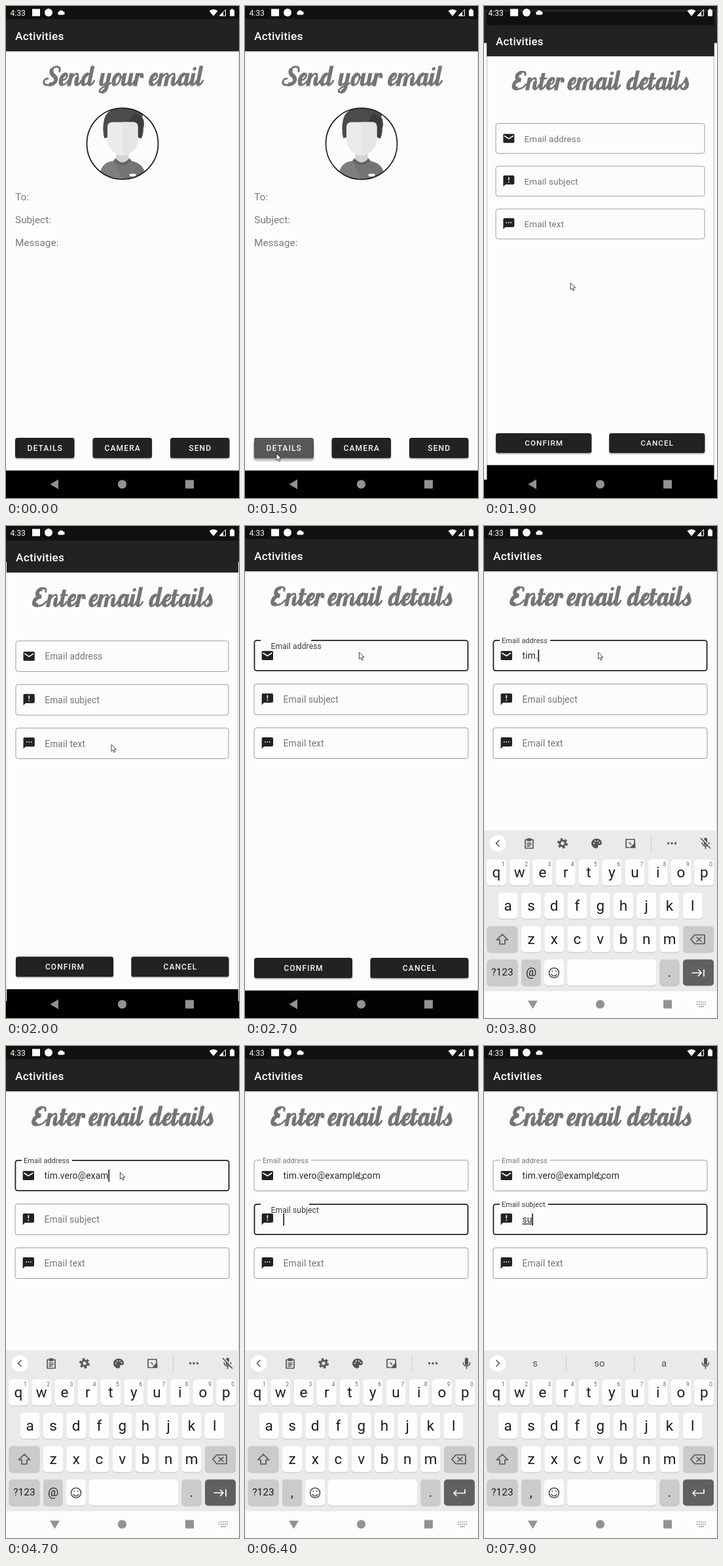
These frames come from a looping animation (356x752 px, 8 s). An HTML page:

```html
<!DOCTYPE html>
<html lang="en">
<head>
<meta charset="utf-8">
<title>Activities</title>
<style>
  html, body { margin: 0; width: 100%; height: 100%; overflow: hidden; background: #000; }
  svg { display: block; width: 356px; height: 752px; font-family: Roboto, sans-serif; }
  .bar { font-size: 17.3px; font-weight: 500; letter-spacing: .25px; fill: #fff; }
  .info { font-size: 15.4px; fill: #7a7a7a; }
  .btn { font-size: 12.1px; font-weight: 500; letter-spacing: 1.08px; fill: #f4f4f4; text-anchor: middle; }
  .title { fill: none; stroke: #757575; }
  .thick { stroke-width: 5.8; }
  .thin { stroke-width: 2.9; stroke-linecap: round; }
  .label, .value { font-size: 13.85px; letter-spacing: .13px; }
  .value { fill: #2a2a2a; }
  .line { fill: none; stroke: #555; stroke-width: 1.7; stroke-linecap: round; stroke-linejoin: round; }
  .key { fill: #1d1d1d; text-anchor: middle; }
  .hint { font-size: 8.5px; fill: #666; text-anchor: middle; }
  .word { font-size: 15px; fill: #555; text-anchor: middle; }
</style>
</head>
<body>
<svg viewBox="0 0 356 752">
  <defs>
    <clipPath id="face"><circle cx="178" cy="210.5" r="54.5"/></clipPath>
    <clipPath id="press"><rect x="14" y="660" width="90.5" height="31" rx="3.5"/></clipPath>
    <clipPath id="board"><rect y="465" width="356" height="247"/></clipPath>
    <g id="frame">
      <rect width="356" height="752"/>
      <rect width="356" height="20" fill="#101010"/>
      <rect y="20" width="356" height="49.3" fill="#222"/>
      <rect y="69.3" width="356" height="640.7" fill="#fcfcfc"/>
      <path d="M355.5,70V710" stroke="#d2d2d2"/>
      <text class="bar" x="14" y="51.7">Activities</text>
    </g>
  </defs>

  <g id="main">
    <use href="#frame"/>
    <g clip-path="url(#face)">
      <path d="M142,268C143,246 150,239 169,236H187C206,239 213,246 214,268Z" fill="#747474"/>
      <path d="M142,268C143,246 150,239 163,237Q172,247 178,268Z" fill="#7e7e7e"/>
      <path d="M164,236Q178,250 192,236L187,232H169Z" fill="#646464"/>
      <path d="M168.500,218H187.500V234Q178,244 168.500,234Z" fill="#d4d4d4"/>
      <path d="M150,202Q147,188 149.500,176Q153,155 178,156Q190,154 199,160L211,164L208,169Q213,177 210,187Q210,198 206,203L201,200V185H155V201Z" fill="#4b4b4b"/>
      <path d="M196,163L207,170Q211,178 207,190V202L201,199V184L186,180Z" fill="#3c3c3c"/>
      <path d="M155,184Q156,177 163,177.500H194Q201,177 201.500,184V203Q201,224 178,229Q155,224 155,203Z" fill="#ebebeb"/>
      <path d="M178,177.500H194Q201,177 201.500,184V203Q201,224 178,229Z" fill="#e5e5e5"/>
      <rect x="188.500" y="256.500" width="10" height="4" rx="2" fill="#fff"/>
    </g>
    <circle cx="178" cy="210.500" r="54.500" fill="none" stroke="#151515" stroke-width="1.700"/>
    <text class="info" x="14" y="296.500">To:</text>
    <text class="info" x="14" y="331.500">Subject:</text>
    <text class="info" x="14" y="366.500">Message:</text>
  </g>

  <g id="details"><use href="#frame"/></g>

  <g clip-path="url(#board)"><g id="keys">
    <rect y="465" width="356" height="250" fill="#eaeaea"/>
    <circle cx="21" cy="485" r="12.500" fill="#fff"/>
    <g id="tools" class="line">
      <path d="M23,480.500L18.500,485L23,489.500"/>
      <path d="M63,479.500H75V492.500H63ZM66.500,478V481H71.500V478ZM66,484.500H72M66,487H72M66,489.500H70"/>
      <circle cx="120" cy="485" r="4.300" stroke-width="3"/>
      <circle cx="120" cy="485" r="6.800" stroke-width="2.400" stroke-linecap="butt" stroke-dasharray="3.560"/>
      <path d="M172,478.500A7,6.500 0 1 0 172,491.800Q174.500,491 173,488.500Q173,487 175,487H177Q179.500,486 179.300,484Q178,478.500 172,478.500Z" fill="#555"/>
      <path d="M168,485h.1M170,481.500h.1M174,481.500h.1M176.500,484h.1" stroke="#eaeaea" stroke-width="2"/>
      <path d="M222,491.500H217V479H230V485"/>
      <path d="M222,484L224.500,486.500M224,491.500H230.500V485Z" fill="#555"/>
      <path d="M255.500,474V497" stroke="#ccc" stroke-width="1"/>
      <path d="M281.500,485h.1M287,485h.1M292.500,485h.1" stroke-width="3.400"/>
    </g>
    <g id="strip">
      <path class="line" d="M19,480.500L23.500,485L19,489.500"/>
      <path d="M125.500,474V497M229.500,474V497" stroke="#ccc"/>
      <text class="word" x="78" y="490">s</text>
      <text class="word" x="176.500" y="490">so</text>
      <text class="word" x="275" y="490">a</text>
    </g>
    <g transform="translate(338.500 485)">
      <rect x="-2.600" y="-8.500" width="5.200" height="11" rx="2.600" fill="#555"/>
      <path class="line" d="M-5.200,-1A5.200,5.200 0 0 0 5.200,-1M0,4.500V8"/>
      <g id="muted"><path d="M-6,-8.500L8,6.500" stroke="#eaeaea" stroke-width="2"/><path class="line" d="M-7,-7.500L7,7.500"/></g>
    </g>
  </g></g>

  <rect id="navBg" y="711" width="356" height="41" fill="#fcfcfc"/>
  <g fill="#929292">
    <path id="back" d="M-7,0L5.500,-7.500V7.500Z"/>
    <circle cx="177.500" cy="731" r="6.600"/>
    <rect x="274" y="724.500" width="13" height="13" rx="1"/>
  </g>
  <g id="switcher" fill="none" stroke="#aaa" stroke-width="1.800">
    <path d="M325,727.500H339M325,731H339" stroke-dasharray="1.800 1.200"/><path d="M328,734.500H336"/>
  </g>

  <g fill="#fff">
    <text x="6.500" y="14.500" font-size="12.100">4:33</text>
    <rect x="40" y="4.500" width="12" height="11"/>
    <circle cx="65" cy="10" r="6"/>
    <path d="M80.500,13.500A3,3 0 0 1 80.800,8.500A4,4 0 0 1 87.500,8.300A2.700,2.700 0 0 1 88,13.500Z"/>
    <path d="M310.500,7.500Q317,2.500 323.500,7.500L317,15.500Z"/>
    <path d="M326,15H335.500V5.500Z" fill="none" stroke="#fff"/><path d="M326,15H332V8.800Z"/>
    <path d="M342,6H344V4.500H347V6H349V15.500H342Z"/>
  </g>

  <path id="pointer" d="M0,0V10.500L2.400,8.300L4,12L5.800,11.200L4.200,7.600L7.500,7.400Z" fill="#fff" stroke="#333" stroke-width=".9"/>
</svg>
<script>
const LOOP = 8000;
const ADDRESS = 'tim.vero@example.com';
const ADDRESS_KEYS = [3500, 3600, 3700, 3800, 3900, 4000, 4100, 4300, 4500, 4500,
  4600, 4700, 4700, 4900, 5000, 5100, 5400, 5500, 5600, 5700];
const SUBJECT_KEYS = [7800, 7900];
const FOCUS = [2600, 6300];

// Script lettering: advance, heavy strokes, hairlines; baseline at y = 0.
const TAIL = x => `M${x},-2.2Q${x + 2.5},-3 ${x + 4},-8`;
const STEM = (x, top = -20) => `M${x},${top}V-6.500Q${x},-2.700 ${x + 3.2},-2.700`;
const BOWL = 'M9.5,-18.300Q3.800,-17 3.800,-9Q3.800,-2.700 7.500,-2.700';
const JOIN = 'M7.5,-2.200Q12,-3 14,-9';
const GLYPHS = {
  S: [23.5, 'M10,-26.500Q8,-20.500 14,-16.500Q20.500,-12.500 19,-7Q17.500,-2.600 10,-2.600',
    'M22,-22.500Q22.500,-30 15.500,-29.700Q10.500,-29 9.500,-25M10.500,-1.800Q1.500,-1 1.500,-7Q1.500,-11.500 6.500,-11.500'],
  E: [22, 'M12,-28Q5,-27 5.500,-21.500Q6.500,-16 13,-16Q3.500,-15 3.500,-8Q3.500,-2.700 10.500,-2.700',
    'M11,-28.700Q18.500,-30 18,-23.500M10.500,-1.800Q19,-2 22,-9'],
  e: [13.5, 'M8.5,-18.500Q3.300,-16.500 3.300,-9Q3.300,-2.700 8,-2.700',
    'M4,-8.500Q11.500,-10 11.500,-15Q11.500,-19.400 8,-19M7.500,-1.900Q12,-2 15,-8.500'],
  n: [20, 'M4,-20V0' + STEM(14, -14), 'M4,-9Q8,-19 12,-19Q14.500,-19 14.500,-14' + TAIL(17)],
  m: [30, 'M4,-20V0M14,-15V0' + STEM(24, -14),
    'M4,-9Q8,-19 12,-19Q14.500,-19 14.500,-14M14,-9Q18,-19 22,-19Q24.500,-19 24.500,-14' + TAIL(27)],
  a: [19, BOWL + STEM(14), 'M9,-18.800Q14,-19 14,-14' + JOIN + TAIL(17)],
  d: [20.5, BOWL + STEM(14, -31), 'M9,-18.800Q14,-19 14,-14' + JOIN + TAIL(17)],
  o: [14.5, BOWL, 'M9,-18.800Q13.500,-18 13.200,-11Q12.500,-2 7.500,-1.900M12.500,-14Q14,-12 16.500,-14'],
  u: [19.5, STEM(4) + STEM(14), JOIN + TAIL(17)],
  y: [19, STEM(4) + 'M14,-20V1Q14,8.500 8.500,8.500', JOIN + 'M9,9.300Q3,9.300 5,5Q8,1 19,-4.500'],
  r: [14, 'M4,-20V0M8.500,-17.500Q12,-17.500 11.300,-12.500', 'M4,-9Q6,-18.500 9.500,-18.800'],
  i: [9.5, STEM(4), TAIL(7) + 'M2.800,-26.500a1.300,1.300 0 1 0 2.600,0a1.300,1.300 0 1 0 -2.600,0'],
  l: [10.5, STEM(4, -31), TAIL(7)],
  t: [11.5, STEM(4, -27), 'M.5,-18.500H10' + TAIL(7)],
  s: [15, 'M8,-18Q8.500,-14 11,-10Q13.500,-3.500 7,-2.700', 'M1,-6Q6,-12 8,-19.500M7,-1.900Q3,-1.700 3,-5'],
};

const $ = id => document.getElementById(id);
const add = (id, markup) => $(id).insertAdjacentHTML('beforeend', markup);
const ramp = (t, a, b) => Math.min(1, Math.max(0, (t - a) / (b - a)));
const smooth = p => p * p * (3 - 2 * p);
const mix = (a, b, p) => a + (b - a) * p;
const show = (id, on) => $(id).setAttribute('visibility', on ? 'visible' : 'hidden');
const zoom = (id, s) =>
  $(id).setAttribute('transform', `translate(178 376) scale(${s}) translate(-178 -376)`);

function title(text, starts) {
  const words = text.split(' ').map((word, i) => {
    let x = starts[i];
    return [...word].map(ch => {
      const [advance, thick, thin] = GLYPHS[ch];
      const glyph = `<g transform="translate(${x} 122.5) skewX(-12)">` +
        `<path class="thick" d="${thick}"/><path class="thin" d="${thin}"/></g>`;
      x += advance;
      return glyph;
    }).join('');
  });
  return `<g class="title" role="img" aria-label="${text}">${words.join('')}</g>`;
}

function button(text, x, width) {
  return `<rect x="${x - .5}" y="662" width="${width + 1}" height="31" rx="4" fill="#000" opacity=".22"/>
    <rect x="${x}" y="660" width="${width}" height="31" rx="3.5" fill="#222"/>
    <text class="btn" x="${x + width / 2 + .5}" y="680">${text}</text>`;
}

const BUBBLE = 'M27.500,15H41Q43,15 43,17V27Q43,29 41,29H29L25.600,32.400V17Q25.600,15 27.500,15Z';
const ICONS = [
  ['M27.200,17H41.400Q43,17 43,18.600V29.400Q43,31 41.400,31H27.200Q25.600,31 25.600,29.400V18.600Q25.600,17 27.200,17Z',
    'M27.300,20L34.300,24.500L41.300,20'],
  [BUBBLE, 'M34.300,17.500V22.500M34.300,24.500V26.200'],
  [BUBBLE, 'M30,22H31.600M33.500,22H35.100M37,22H38.600'],
];

function field(label, i) {
  const [shape, mark] = ICONS[i];
  return `<g transform="translate(0 ${174 + 67 * i})">
    <rect id="box${i}" rx="3.5" fill="none"/>
    <rect id="notch${i}" x="24" y="-1" width="${i ? 74 : 77}" height="4" fill="#fcfcfc"/>
    <path d="${shape}" fill="#222"/><path d="${mark}" fill="none" stroke="#fcfcfc" stroke-width="1.6"/>
    <text class="label" id="label${i}">${label}</text>
    <text class="value" id="value${i}" x="58.5" y="29.3"${i ? ' text-decoration="underline"' : ''}></text>
    <rect id="caret${i}" y="15" width="1.7" height="18.5" fill="#222"/></g>`;
}

function key(x, y, w, text = '', fill = '#fdfdfd', size = 22.5) {
  return `<rect x="${x}" y="${y + 1}" width="${w}" height="40" rx="5" fill="#c2c2c2"/>
    <rect x="${x}" y="${y}" width="${w}" height="40" rx="5" fill="${fill}"/>
    <text class="key" x="${x + w / 2}" y="${y + 20 + size * .32}" font-size="${size}">${text}</text>`;
}

function keyboard() {
  const rows = [['qwertyuiop', 4, 509.5], ['asdfghjkl', 21.7, 560.5], ['zxcvbnm', 57, 611.5]];
  const letters = rows.map(([chars, x, y], r) => [...chars].map((ch, i) => {
    const left = x + 35.25 * i;
    return key(left, y, 30, ch) +
      (r ? '' : `<text class="hint" x="${left + 25.5}" y="519.5">${(i + 1) % 10}</text>`);
  }).join('')).join('');
  const grey = '#cbcbcb', y = 662.5;
  return letters +
    key(4.5, 611.5, 47, '', grey) + key(304, 611.5, 47, '', grey) +
    key(4.5, y, 47, '?123', grey, 15.5) +
    `<g id="at">${key(57, y, 30, '@', grey, 18)}</g><g id="comma">${key(57, y, 30, ',', grey, 20)}</g>` +
    key(92, y, 30) + key(127, y, 136) + key(268.5, y, 30, '.', grey, 20) +
    key(304, y, 47, '', '#606060') +
    `<g class="line">
      <path d="M28,624L36.500,632.500H32V639H24V632.500H19.500Z"/>
      <path d="M322,625H337V638.500H322L316,631.800ZM325,628.500L332,635M332,628.500L325,635"/>
      <circle cx="107" cy="683" r="7.5"/>
      <path d="M103,685.500Q107,690 111,685.500"/><path d="M104.300,680.500h.1M109.700,680.500h.1" stroke-width="2.2"/>
      <path id="next" d="M318,683H332M327.500,678.500L332,683L327.500,687.500M336,678V688" stroke="#fff"/>
      <path id="enter" d="M336,678V683.500H319M323,679.500L319,683.500L323,687.500" stroke="#fff"/></g>`;
}

add('main', title('Send your email', [55, 140, 216]) +
  button('DETAILS', 14, 90.5) + button('CAMERA', 132.5, 90.5) + button('SEND', 251, 90.5) +
  `<g id="pressed"><rect x="12.500" y="664" width="93.500" height="32" rx="5" opacity=".18"/>
   <rect x="14" y="660" width="90.500" height="31" rx="3.500" fill="#222"/>
   <circle id="ripple" cx="50" cy="686" fill="#575757" clip-path="url(#press)"/>
   <text class="btn" x="59.750" y="680">DETAILS</text></g>`);
add('details', title('Enter email details', [37, 124, 216]) +
  ['Email address', 'Email subject', 'Email text'].map(field).join('') +
  button('CONFIRM', 14, 150) + button('CANCEL', 191.5, 150));
add('keys', keyboard());

// The outline grows inwards from a fixed outer edge.
function outline(box, color, width) {
  const attrs = { stroke: color, 'stroke-width': width,
    x: 13.5 + width / 2, y: width / 2, width: 328 - width, height: 48 - width };
  for (const name in attrs) box.setAttribute(name, attrs[name]);
}

function drawField(i, t, text, events) {
  const started = FOCUS[i], active = t >= started && !(t >= FOCUS[i + 1]);
  const p = started ? ramp(t, started, started + 167) : 0;
  const label = $('label' + i);
  outline($('box' + i), active ? '#222' : '#9c9c9c', active ? 1.8 : 1);
  show('notch' + i, p > 0);
  label.setAttribute('fill', active ? '#3a3a3a' : '#757575');
  label.setAttribute('transform',
    `translate(${mix(58.5, 27, p)} ${mix(29.3, 4.8, p)}) scale(${mix(1, .79, p)})`);
  $('value' + i).textContent = text;
  const last = events.filter(e => e <= t).pop();
  show('caret' + i, active && (t - last) % 1000 < 500);
  $('caret' + i).setAttribute('x', 58.3 + (text ? $('value' + i).getComputedTextLength() : 0));
}

const PATH = [[800, 272, 685], [1200, 48, 684], [1700, 48, 684], [2000, 161, 334], [2500, 174.5, 193]];

function drawPointer(t) {
  show('pointer', t >= PATH[0][0]);
  let i = 0;
  while (i < PATH.length - 2 && t > PATH[i + 1][0]) i++;
  const [a, ax, ay] = PATH[i], [b, bx, by] = PATH[i + 1], p = smooth(ramp(t, a, b));
  $('pointer').setAttribute('transform', `translate(${mix(ax, bx, p)} ${mix(ay, by, p)})`);
}

function draw(t) {
  show('pressed', t >= 1250);
  $('ripple').setAttribute('r', 62 * ramp(t, 1250, 1480));

  const left = (1 - ramp(t, 1700, 2200)) ** 3.5;
  zoom('main', 1.05 - .05 * left);
  zoom('details', 1 - .15 * left);
  $('details').setAttribute('opacity', ramp(t, 1690, 1800));

  const typed = (word, keys) => word.slice(0, keys.filter(k => k <= t).length);
  drawField(0, t, typed(ADDRESS, ADDRESS_KEYS), [2800, ...ADDRESS_KEYS]);
  drawField(1, t, typed('su', SUBJECT_KEYS), [6390, ...SUBJECT_KEYS]);
  drawField(2, t, '', []);

  const rise = 1 - (1 - ramp(t, 2700, 2960)) ** 3;
  $('keys').setAttribute('transform', `translate(0 ${250 * (1 - rise)})`);
  $('navBg').setAttribute('opacity', rise);
  $('back').setAttribute('transform',
    `translate(74.5 731) rotate(${-90 * smooth(ramp(t, 2930, 3230))})`);
  show('switcher', t >= 2900);

  const subject = t >= FOCUS[1], hints = t >= 7900;
  show('at', !subject); show('next', !subject); show('muted', !subject);
  show('comma', subject); show('enter', subject);
  show('tools', !hints); show('strip', hints);

  drawPointer(t);
}

function tick() {
  draw(performance.now() % LOOP);
  requestAnimationFrame(tick);
}
tick();
</script>
</body>
</html>
```
